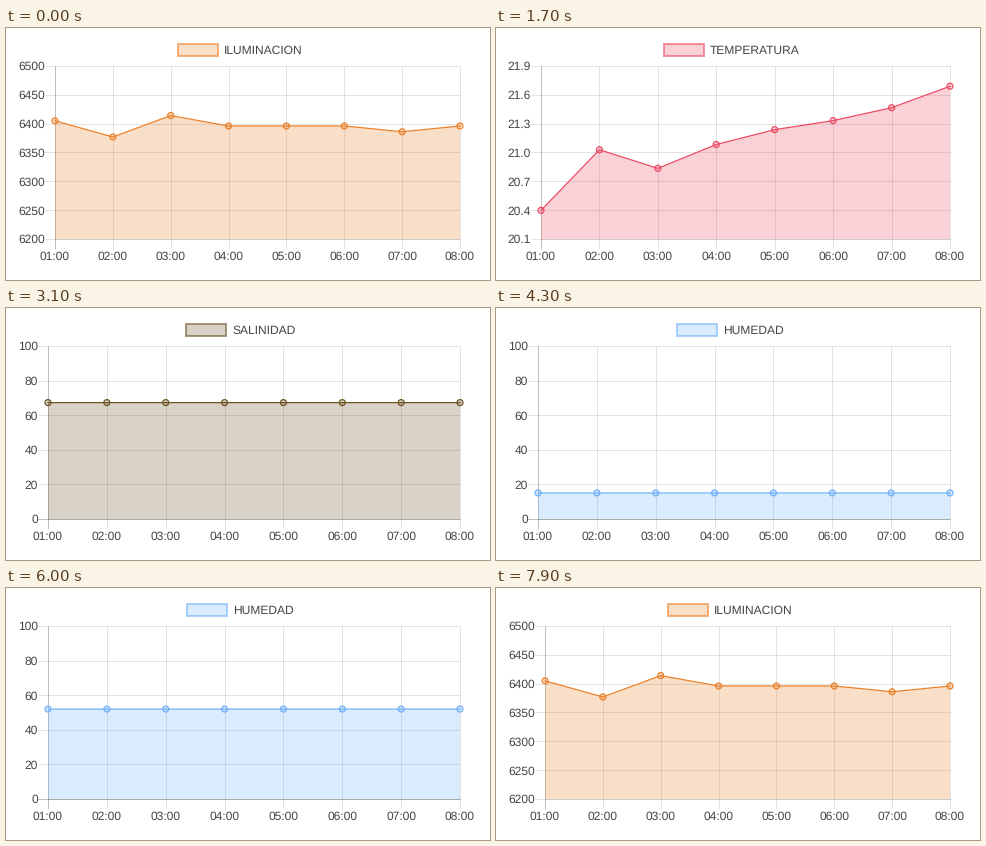
These frames come from a looping animation (484x252 px, 8 s). A matplotlib script:

```python
import matplotlib.pyplot as plt
from matplotlib.animation import FuncAnimation
from matplotlib.patches import Circle, Polygon, Rectangle

WIDTH, HEIGHT, DPI = 484, 252, 100
PX = 72 / DPI
FRAME_MS, FRAMES = 100, 80
TOP, BOTTOM, RIGHT = 38, 211, 454
TICK = 10
EASE_MS = 1000
HOURS = [f"{h:02d}:00" for h in range(1, 9)]

plt.rcParams["font.family"] = "Liberation Sans"
plt.rcParams["text.hinting"] = "none"

LIGHT = dict(
    title="ILUMINACION", color="#eb7f27", left=49, legend_x=172,
    low=6200, step=50, ticks=7, fmt="{:.0f}",
    values=[6405, 6377, 6414, 6396, 6396, 6396, 6386, 6396])
TEMPERATURE = dict(
    title="TEMPERATURA", color="#ec4862", left=45, legend_x=168,
    low=20.1, step=0.3, ticks=7, fmt="{:.1f}",
    values=[20.4, 21.035, 20.84, 21.09, 21.245, 21.34, 21.475, 21.7])
SALINITY = dict(
    title="SALINIDAD", color="#6b5322", left=42, legend_x=180,
    low=0, step=20, ticks=6, fmt="{:.0f}", values=[76] * 8)
HUMIDITY = dict(
    title="HUMEDAD", color="#6fb0fb", left=42, legend_x=181,
    low=0, step=20, ticks=6, fmt="{:.0f}", values=[52] * 8)

# (first visible at ms, ms already grown by then, chart)
TIMELINE = [(0, EASE_MS, LIGHT), (1000, 16, TEMPERATURE), (2800, 118, SALINITY),
            (4300, 82, HUMIDITY), (6100, 50, LIGHT)]

fig = plt.figure(figsize=(WIDTH / DPI, HEIGHT / DPI), dpi=DPI, facecolor="white")
ax = fig.add_axes([0, 0, 1, 1])


def ease_out_quart(t):
    return 1 - (1 - min(t, 1)) ** 4


def line(xs, ys, alpha):
    ax.plot(xs, ys, color="black", alpha=alpha, lw=PX, solid_capstyle="butt")


def label(x, y, text, align):
    """Text whose capitals are centred on y."""
    ax.text(x, y + 4.3, text, ha=align, va="baseline",
            fontsize=12 * PX, color="#444444")


def draw_grid(chart, xs):
    left = chart["left"]
    for i, (x, hour) in enumerate(zip(xs, HOURS)):
        gx = round(x) - 0.5
        line([gx, gx], [TOP, BOTTOM + TICK], 0.25 if i == 0 else 0.11)
        label(x, 228, hour, "center")
    for i in range(chart["ticks"]):
        value = chart["low"] + i * chart["step"]
        y = BOTTOM - (BOTTOM - TOP) * i / (chart["ticks"] - 1)
        gy = round(y) - 0.5
        line([left - TICK, RIGHT], [gy, gy], 0.25 if value == 0 else 0.11)
        label(left - TICK, y, chart["fmt"].format(value), "right")
    line([left, RIGHT], [BOTTOM - 0.5] * 2, 0.1)


def draw_legend(chart):
    x, color = chart["legend_x"], chart["color"]
    ax.add_patch(Rectangle((x, 16), 40, 12, fc=color, alpha=0.25, lw=0))
    ax.add_patch(Rectangle((x, 16), 40, 12, fill=False, ec=color,
                           alpha=0.58, lw=2 * PX, joinstyle="miter"))
    label(x + 46, 21.7, chart["title"], "left")


def draw_series(chart, xs, growth):
    color = chart["color"]
    scale = (BOTTOM - TOP) / (chart["step"] * (chart["ticks"] - 1))
    ys = [BOTTOM - (v - chart["low"]) * scale * growth for v in chart["values"]]
    outline = [(xs[0], BOTTOM), *zip(xs, ys), (xs[-1], BOTTOM)]
    ax.add_patch(Polygon(outline, fc=color, alpha=0.25, lw=0,
                         snap=False, zorder=3))
    ax.plot(xs, ys, color=color, lw=1.2 * PX, snap=False, zorder=4)
    for x, y in zip(xs, ys):
        ax.add_patch(Circle((x, y), 3, fc=color, alpha=0.25, lw=0,
                            snap=False, zorder=5))
        ax.add_patch(Circle((x, y), 3, fill=False, ec=color, lw=1.2 * PX,
                            snap=False, zorder=6))


def draw(frame):
    now = frame * FRAME_MS
    shown, grown, chart = [item for item in TIMELINE if item[0] <= now][-1]
    ax.clear()
    ax.set(xlim=(0, WIDTH), ylim=(HEIGHT, 0))
    ax.axis("off")
    left = chart["left"]
    xs = [left + (RIGHT - left) * i / 7 for i in range(8)]
    draw_grid(chart, xs)
    draw_legend(chart)
    draw_series(chart, xs, ease_out_quart((now - shown + grown) / EASE_MS))
    return []


animation = FuncAnimation(fig, draw, frames=FRAMES, interval=FRAME_MS,
                          init_func=lambda: [], repeat=True, repeat_delay=0)
plt.show()
```
